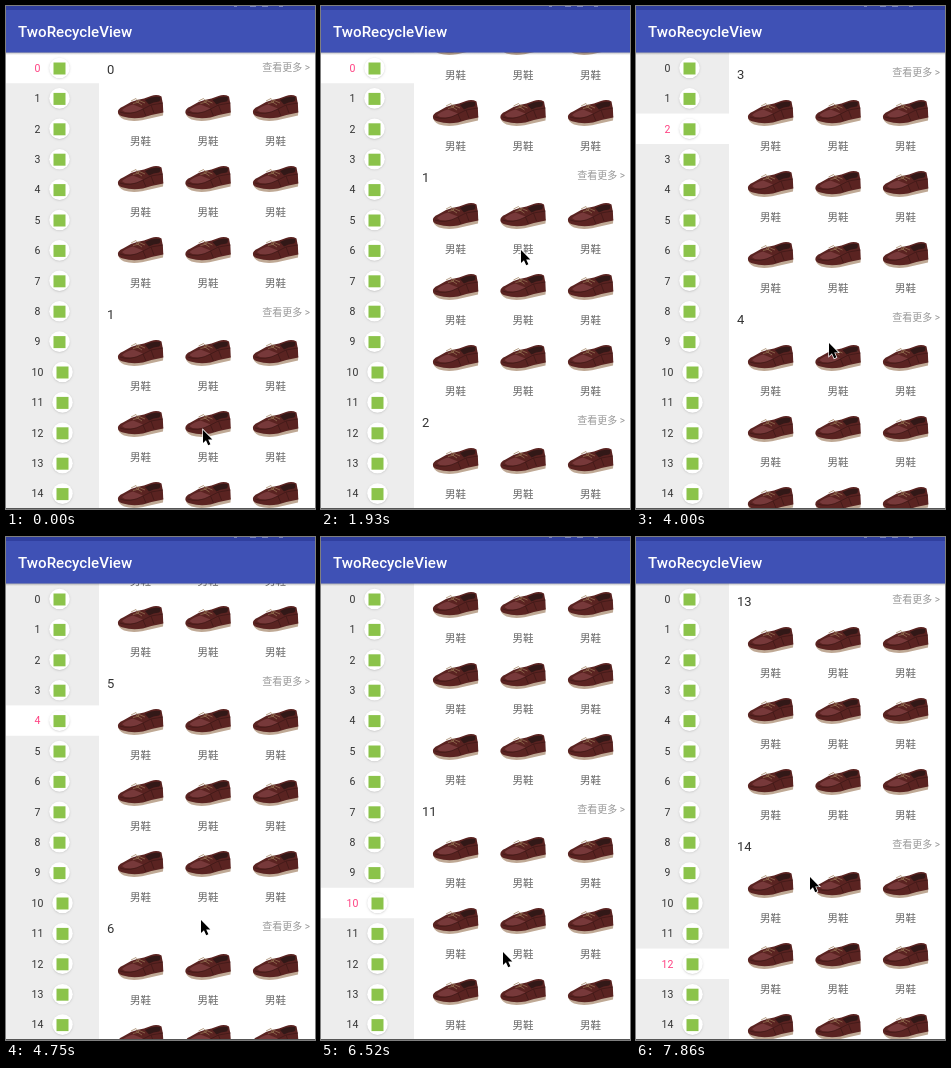
Recreate the animation shown at these times as an HTML page with a canvas. Size 309 by 503 pixels, loop 8000 ms.

```html
<!DOCTYPE html>
<html lang="zh-CN">
<head>
<meta charset="utf-8">
<title>TwoRecycleView</title>
<style>
  html, body { margin: 0; width: 100%; height: 100%; overflow: hidden; background: #fff; }
  canvas { display: block; width: 309px; height: 503px; }
</style>
</head>
<body>
<canvas id="stage"></canvas>
<script>
const W = 309, H = 503, LOOP = 8000, STEP = 148.15, LAST_STEP = 51;
const TOP = 46, SIDE_W = 93, ROW_H = 30.4, SECTION_H = 245, ITEM_H = 71;
const FONT = 'Roboto, "Noto Sans CJK SC", "Noto Sans CJK", sans-serif';

const canvas = document.getElementById('stage');
const ctx = canvas.getContext('2d');
const ratio = window.devicePixelRatio || 1;
canvas.width = W * ratio;
canvas.height = H * ratio;
ctx.scale(ratio, ratio);

// Poses over time: step, list scroll, pointer x, pointer y
const poses = [
  [0, 0, 197, 424],
  [11, 137, 200, 244],
  [19, 338, 190, 275],
  [30, 1142, 195, 383],
  [37, 1910, 188, 378],
  [42, 2484, 182, 415],
  [51, 3184, 174, 340]
];

// Smooth cubic through the poses
function valueAt(step, column) {
  let i = 0;
  while (i < poses.length - 2 && step >= poses[i + 1][0]) i++;
  const slope = j => {
    const a = poses[Math.max(j - 1, 0)], b = poses[Math.min(j + 1, poses.length - 1)];
    return (b[column] - a[column]) / (b[0] - a[0]);
  };
  const a = poses[i], b = poses[i + 1], span = b[0] - a[0];
  const u = (step - a[0]) / span, v = 1 - u;
  return a[column] * v * v * (1 + 2 * u) + b[column] * u * u * (3 - 2 * u)
    + span * u * v * (slope(i) * v - slope(i + 1) * u);
}

function rect(x, y, w, h, color) {
  ctx.fillStyle = color;
  ctx.fillRect(x, y, w, h);
}

function text(string, x, y, size, color, align = 'left', weight = 400) {
  ctx.font = `${weight} ${size}px ${FONT}`;
  ctx.fillStyle = color;
  ctx.textAlign = align;
  ctx.fillText(string, x, y);
}

// Shoe shapes, in a box 46 wide and 27 high, toe at the lower left
const shoe = [
  ['#bfa995', 'M0 17 Q0 22 6 24.5 Q14 27 24 25.2 L45 20.5 L45.3 16 L22 20Z'],
  ['#5a2321', 'M0 18 Q-1 14 5 11.5 L13 7 L19 5 L26 3.5 L33 1 Q39 -1 43.5 1.5 Q45.5 9 45.3 17.5 Q34 19.5 25 22.5 Q14 24.5 5 21.5 Q1 20.5 0 18Z'],
  ['#77393a', 'M4 15 Q8 11 15 9.5 L25 13.5 Q20 17.5 12 17.5 Q6 17.5 4 15Z'],
  ['#321817', 'M27 5 Q35 .5 42 2 Q43 5 41 6.5 Q35 7 31 9.5Z']
].map(([color, path]) => [color, new Path2D(path)]);
const laces = new Path2D('M13 6 L18 3.5 L21 7 L15 8.5 M20 5 L27 8 M18 6 L24 10');
const seam = new Path2D('M2 17 Q12 21 25 14 L33 10 L45 8 M25 14 L28 21 M33 10 L36 18');

function drawShoe(x, y) {
  ctx.save();
  ctx.translate(x, y);
  for (const [color, path] of shoe) {
    ctx.fillStyle = color;
    ctx.fill(path);
  }
  ctx.lineWidth = 0.7;
  ctx.strokeStyle = '#3d1716';
  ctx.stroke(seam);
  ctx.strokeStyle = '#9a7a58';
  ctx.stroke(laces);
  ctx.restore();
}

function drawSection(n, y) {
  text(n, 101, y + 21.6, 13, '#333');
  text('查看更多 >', 304, y + 18.8, 10, '#999', 'right');
  for (let i = 0; i < 9; i++) {
    const x = 134.5 + 67.5 * (i % 3), top = y + ITEM_H * Math.floor(i / 3);
    drawShoe(x - 22.5, top + 43);
    text('男鞋', x, top + 93.4, 10.5, '#666', 'center');
  }
}

function drawList(scroll) {
  ctx.save();
  ctx.beginPath();
  ctx.rect(SIDE_W, TOP, W - SIDE_W, H - TOP);
  ctx.clip();
  const first = Math.floor(scroll / SECTION_H);
  for (let n = first; n < first + 3; n++) drawSection(n, TOP + n * SECTION_H - scroll);
  ctx.restore();
}

function drawSidebar(selected) {
  rect(0, TOP, SIDE_W, H - TOP, '#ededed');
  for (let n = 0; n < 15; n++) {
    const top = 46.8 + n * ROW_H, y = top + ROW_H / 2, x = n < 10 ? 53.5 : 56.5;
    if (n === selected) rect(0, top, SIDE_W, ROW_H, '#fff');
    text(n, 31.5, y + 3.8, 10.5, n === selected ? '#ff4081' : '#333', 'center');
    ctx.save();
    ctx.shadowColor = 'rgba(0,0,0,.17)';
    ctx.shadowBlur = 2 * ratio;
    ctx.shadowOffsetY = 0.6 * ratio;
    ctx.fillStyle = '#fff';
    ctx.beginPath();
    ctx.arc(x, y, 10.3, 0, 2 * Math.PI);
    ctx.fill();
    ctx.restore();
    rect(x - 6, y - 5.5, 12, 12, '#8bc34a');
  }
}

function drawToolbar() {
  const shadow = ctx.createLinearGradient(0, TOP, 0, TOP + 3);
  shadow.addColorStop(0, 'rgba(0,0,0,.3)');
  shadow.addColorStop(1, 'rgba(0,0,0,0)');
  rect(0, TOP, W, 3, shadow);
  rect(0, 0, W, TOP + 0.5, '#3f51b5');
  rect(0, 0, W, 4, '#303f9f');
  for (const [x, w] of [[228, 3], [244, 6], [256, 6], [273, 4]]) {
    rect(x, 0, w, 1, 'rgba(255,255,255,.35)');
  }
  text('TwoRecycleView', 12, 31, 15.1, '#fff', 'left', 500);
}

const arrow = new Path2D('M0 0 V15 L3.4 11.8 L6 17.6 L8.5 16.5 L6 10.8 H10.7Z');

function drawPointer(x, y) {
  ctx.save();
  ctx.translate(x, y);
  ctx.scale(0.87, 0.87);
  ctx.lineWidth = 1.6;
  ctx.strokeStyle = '#fff';
  ctx.stroke(arrow);
  ctx.fillStyle = '#000';
  ctx.fill(arrow);
  ctx.restore();
}

function draw(now) {
  const step = Math.min(LAST_STEP, Math.max(0, Math.floor((now % LOOP - 292) / STEP)));
  const scroll = Math.round(valueAt(step, 1));
  rect(0, 0, W, H, '#fff');
  drawList(scroll);
  drawSidebar(Math.floor(scroll / SECTION_H));
  drawToolbar();
  rect(0, H - 1, W, 1, '#555');
  drawPointer(Math.round(valueAt(step, 2)), Math.round(valueAt(step, 3)));
}

const start = performance.now();
function tick() {
  draw(performance.now() - start);
  requestAnimationFrame(tick);
}
tick();
</script>
</body>
</html>
```
